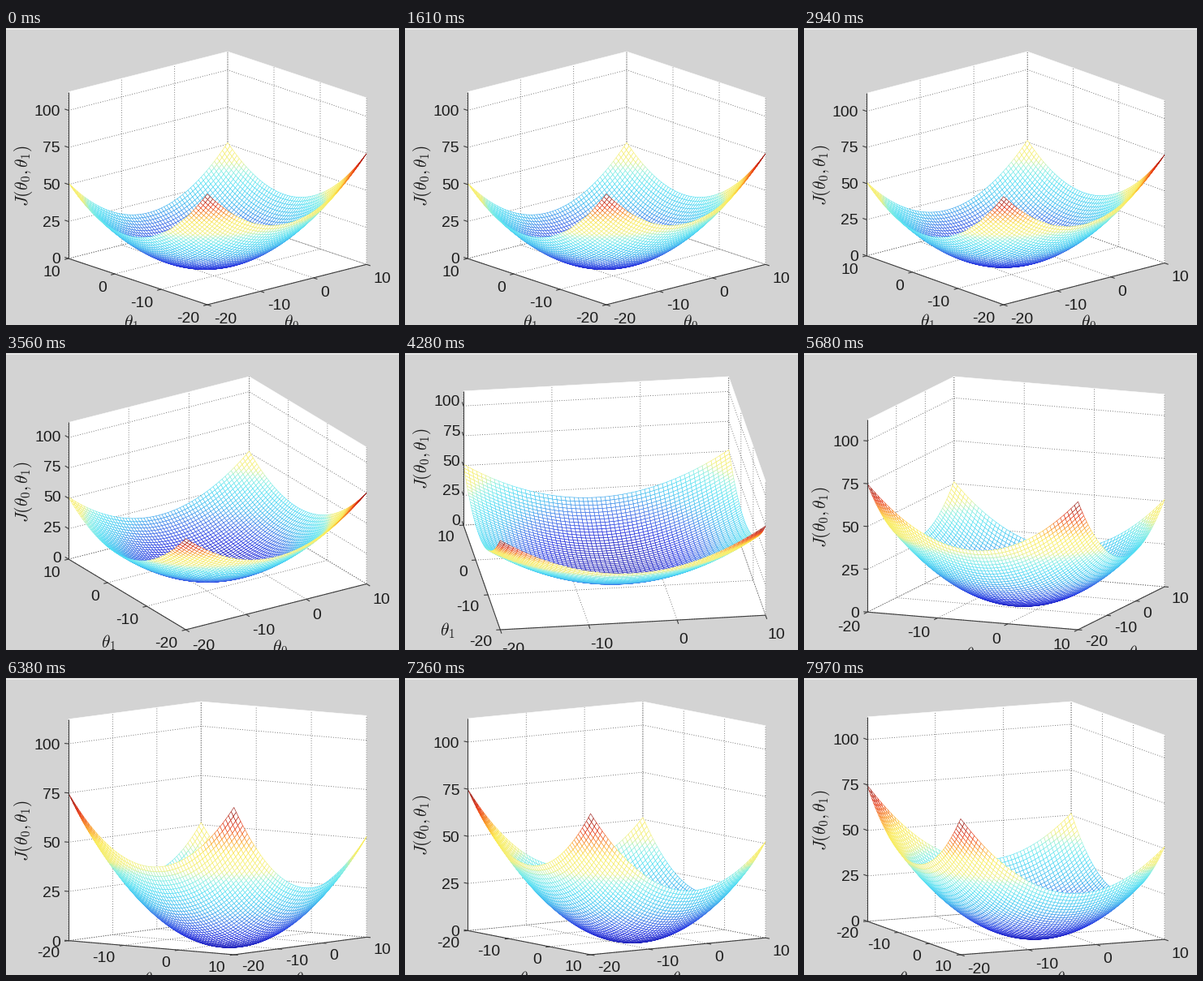
Recreate the animation shown at these times as a matplotlib script. Size 484x366 px, loop 8 s.

```python
import matplotlib.pyplot as plt
import numpy as np
from matplotlib.animation import FuncAnimation
from matplotlib.collections import LineCollection, PolyCollection
from matplotlib.colors import LinearSegmentedColormap

W, H = 484, 366
LOOP, INTERVAL = 8000, 50
LO, HI, ZTOP = -20, 10, 112.5
RIGHT, TOP, BOTTOM = 444, 29, 341
TICKS = (-20, -10, 0, 10)
ZTICKS = (0, 25, 50, 75, 100)

# Camera path: time, azimuth, elevation, left edge of the plot box
TIMES = np.array([2700, 3560, 4280, 4970, 6380, 7970])
AZIM = np.array([-41.1, -33.15, -7.64, 5.5, 38.9, 65.4])
ELEV = np.array([20.2, 31.5, 38.2, 26.7, 5.8, 10.2])
LEFT = np.array([77, 77, 72, 79.5, 77, 78])


def smooth(ms, values):
    """Monotone cubic interpolation over TIMES, starting from rest."""
    ms = np.clip(ms, TIMES[0], TIMES[-1])
    step = np.diff(TIMES)
    rate = np.diff(values) / step
    slope = np.zeros(len(values))
    for i in range(1, len(rate)):
        a, b = rate[i - 1], rate[i]
        if a * b > 0:
            slope[i] = 2 * a * b / (a + b)
    slope[-1] = rate[-1] * 0.8
    i = min(np.searchsorted(TIMES, ms, side="right") - 1, len(rate) - 1)
    s = (ms - TIMES[i]) / step[i]
    return (values[i] * (1 + 2 * s) * (1 - s) ** 2
            + values[i + 1] * s * s * (3 - 2 * s)
            + step[i] * s * (1 - s) * (slope[i] * (1 - s) - slope[i + 1] * s))


def cost(x, y):
    return 0.15 * (x + 5) ** 2 + 0.147 * (y + 2.3) ** 2 - 5


class View:
    """Orthographic view stretched to fill the plot rectangle."""

    def __init__(self, ms):
        self.az = np.radians(smooth(ms, AZIM))
        self.el = np.radians(smooth(ms, ELEV))
        self.left = smooth(ms, LEFT)

    def project(self, x, y, z):
        x, y = ((np.asarray(c) - LO) / (HI - LO) - 0.5 for c in (x, y))
        z = np.asarray(z) / ZTOP - 0.5
        ca, sa = np.cos(self.az), np.sin(self.az)
        ce, se = np.cos(self.el), np.sin(self.el)
        span = abs(ca) + abs(sa)
        u = (ca * x + sa * y) / span
        v = (se * (ca * y - sa * x) + ce * z) / (se * span + ce)
        px = self.left + (u + 0.5) * (RIGHT - self.left)
        py = BOTTOM - (v + 0.5) * (BOTTOM - TOP)
        return np.stack([px, py], axis=-1)

    def path(self, *points):
        return self.project(*np.array(points, float).T)

    def heading(self, start, end):
        a, b = self.path(start, end)
        return (b - a) / np.hypot(*(b - a))


# Mesh quads
axis = np.linspace(LO, HI, 61)
gx, gy = np.meshgrid(axis, axis)
gz = cost(gx, gy)


def corners(g):
    return np.stack([g[:-1, :-1], g[:-1, 1:], g[1:, 1:], g[1:, :-1]],
                    axis=-1).reshape(-1, 4)


qx, qy, qz = corners(gx), corners(gy), corners(gz)
heat = LinearSegmentedColormap.from_list("heat", [
    (0.0, "#1414b4"), (0.1, "#1c2ce0"), (0.2, "#3870e8"),
    (0.3, "#3cbcf0"), (0.42, "#50e0f4"), (0.51, "#88f0e0"),
    (0.57, "#f2f078"), (0.7, "#fcec50"), (0.78, "#fca028"),
    (0.88, "#e83010"), (1.0, "#801010")])
colors = heat((qz.mean(axis=1) - gz.min()) / (gz.max() - gz.min()))

plt.rcParams["mathtext.fontset"] = "cm"
fig = plt.figure(figsize=(W / 72, H / 72), dpi=72, facecolor="#d3d3d3")
ax = fig.add_axes([0, 0, 1, 1])
ax.set_xlim(0, W)
ax.set_ylim(H, 0)
ax.axis("off")
ax.plot([0, W], [0.5, 0.5], color="#efefef", lw=1)

walls = PolyCollection([], facecolors="white", edgecolors="white",
                       linewidths=0.5, zorder=1)
grid = LineCollection([], colors="#5c5c5c", linewidths=0.8,
                      linestyles=[(0, (1.2, 2.4))], zorder=2)
mesh = PolyCollection([], facecolors="white", linewidths=0.6, zorder=3)
frame = LineCollection([], colors="#3c3c3c", linewidths=1.1, zorder=4)
for part in (walls, grid, mesh, frame):
    ax.add_collection(part, autolim=False)


def tick_texts(values):
    return [ax.text(0, 0, str(v), family="Liberation Sans", size=19.4,
                    color="#1c1c1c", va="baseline", zorder=5) for v in values]


def math_text(text, **kw):
    return ax.text(0, 0, text, size=21.4, color="#1c1c1c", ha="center",
                   va="center", zorder=5, **kw)


x_texts, y_texts, z_texts = (tick_texts(v) for v in (TICKS, TICKS, ZTICKS))
x_name = math_text(r"$\theta_0$")
y_name = math_text(r"$\theta_1$")
z_name = math_text(r"$J(\theta_0,\theta_1)$", rotation=90)


def place_ticks(texts, points, out, drop):
    """Put tick labels beside their points; return the tick marks."""
    right = out[0] > 0
    for text, p in zip(texts, points):
        text.set_ha("left" if right else "right")
        text.set_position((p[0] + 10 * out[0] - (1 if right else 0.5),
                           p[1] + drop + 7))
    return [np.array([p, p + 5 * out]) for p in points]


def place_name(text, ends, out):
    a, b = ends
    d = (b - a) / np.hypot(*(b - a))
    nx = -d[1] if d[0] > 0 else d[1]
    mid = (a + b) / 2
    dx = 45 * nx * min(1, 1.9 * abs(nx))
    dy = 36 + min(30, 45 * abs(nx)) + 16 * max(0, out[1] - 0.3)
    text.set_position(mid + (dx, dy))


def draw(i):
    view = View(i * INTERVAL + 20)
    path = view.path
    near, far = (LO, HI) if view.az < 0 else (HI, LO)

    walls.set_verts([
        path((LO, LO, 0), (HI, LO, 0), (HI, HI, 0), (LO, HI, 0)),
        path((LO, HI, 0), (HI, HI, 0), (HI, HI, ZTOP), (LO, HI, ZTOP)),
        path((far, LO, 0), (far, HI, 0), (far, HI, ZTOP), (far, LO, ZTOP))])

    lines = [path((near, HI, z), (far, HI, z), (far, LO, z)) for z in ZTICKS]
    for t in TICKS:
        lines.append(path((t, LO, 0), (t, HI, 0), (t, HI, ZTOP)))
        lines.append(path((near, t, 0), (far, t, 0), (far, t, ZTOP)))
    grid.set_segments(lines)

    # Paint the quads from back to front
    depth = np.sin(view.az) * qx.mean(axis=1) - np.cos(view.az) * qy.mean(axis=1)
    order = np.argsort(depth)
    mesh.set_verts(view.project(qx, qy, qz)[order])
    mesh.set_edgecolor(colors[order])

    x_ends = path((LO, LO, 0), (HI, LO, 0))
    y_ends = path((near, LO, 0), (near, HI, 0))
    zy = HI if view.az < 0 else LO
    z_ends = path((LO, zy, 0), (LO, zy, ZTOP))

    x_out = view.heading((LO, HI, 0), (LO, LO, 0))
    y_out = view.heading((far, LO, 0), (near, LO, 0))
    z_out = -x_out if view.az < 0 else view.heading((HI, LO, 0), (LO, LO, 0))

    marks = place_ticks(x_texts, path(*[(t, LO, 0) for t in TICKS]),
                        x_out, 12.5 + 10 * x_out[1])
    marks += place_ticks(y_texts, path(*[(near, t, 0) for t in TICKS]),
                         y_out, 12.5 + 10 * y_out[1])
    marks += place_ticks(z_texts, path(*[(LO, zy, t) for t in ZTICKS]),
                         z_out, min(0, 10 * z_out[1] + 2.5))
    frame.set_segments([x_ends, y_ends, z_ends] + marks)

    place_name(x_name, x_ends, x_out)
    place_name(y_name, y_ends, y_out)
    z_name.set_position((21.5, z_ends[:, 1].mean() + 1))
    return []


anim = FuncAnimation(fig, draw, frames=LOOP // INTERVAL, interval=INTERVAL,
                     init_func=lambda: draw(0), repeat=True, repeat_delay=0)
plt.show()
```
